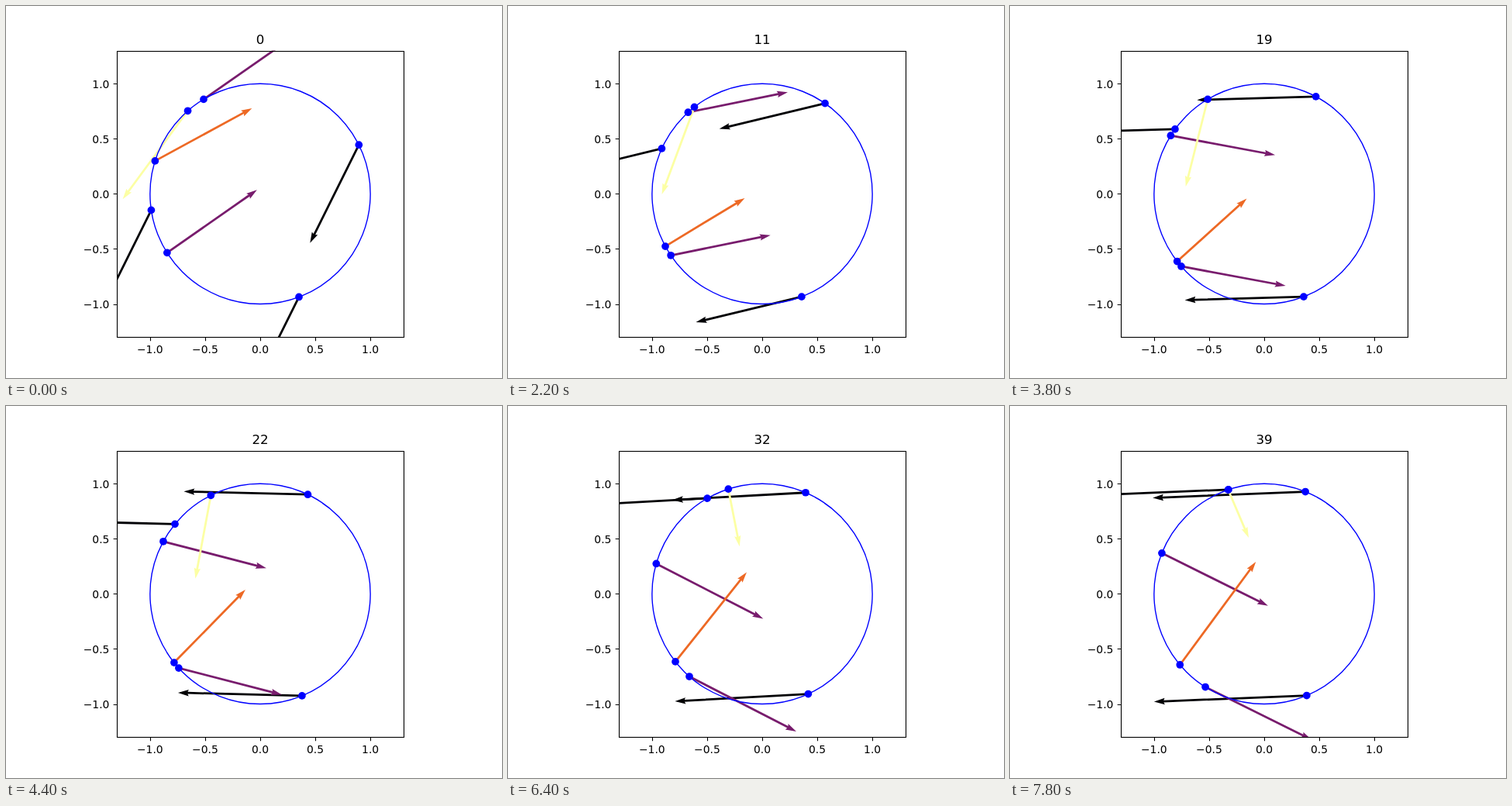
Animation, 640 px wide and 480 px high, one loop 8000 ms. Source, as an HTML page:

```html
<!DOCTYPE html>
<html lang="en">
<head>
<meta charset="utf-8">
<title>Particles on a circle</title>
<style>
  html, body { margin: 0; width: 100%; height: 100%; overflow: hidden; background: #fff; }
  svg { display: block; width: 640px; height: 480px; }
  text { font: 13.89px "DejaVu Sans", sans-serif; }
  #title { font-size: 16.67px; }
</style>
</head>
<body>
<svg viewBox="0 0 640 480">
  <clipPath id="area"><rect x="143.2" y="57.6" width="369.6" height="369.6"/></clipPath>
  <g clip-path="url(#area)">
    <g id="arrows"></g>
    <circle cx="328" cy="242.4" r="142.15" fill="none" stroke="#00f" stroke-width="1.39"/>
    <g id="dots" fill="#00f"></g>
  </g>
  <g id="axes" stroke="#000" stroke-width="1.11" fill="none">
    <rect x="143.5" y="58.5" width="370" height="369"/>
  </g>
  <g id="labels"></g>
  <text id="title" x="328" y="49" text-anchor="middle">0</text>
</svg>
<script>
const CX = 328, CY = 242.4, R = 142.15, STEP = 200, STEPS = 40;
const $ = id => document.getElementById(id);

function add(parent, tag, attrs, text) {
  const el = document.createElementNS('http://www.w3.org/2000/svg', tag);
  for (const k in attrs) el.setAttribute(k, attrs[k]);
  if (text) el.textContent = text;
  return $(parent).appendChild(el);
}

// Axis ticks and labels
for (const v of [-1, -0.5, 0, 0.5, 1]) {
  const label = v.toFixed(1).replace('-', '\u2212');
  const x = CX + v * R, y = CY - v * R;
  const sx = Math.round(x) + 0.5, sy = Math.floor(y + 0.5) + 0.5;
  add('axes', 'path', { d: `M${sx} 427.5v4.86M143.5 ${sy}h-4.86` });
  add('labels', 'text', { x, y: 447.7, 'text-anchor': 'middle' }, label);
  add('labels', 'text', { x: 133.4, y: y + 5.3, 'text-anchor': 'end' }, label);
}

// Steps at which angles (degrees) and arrow vectors (pixels) are known
const keys = [0, 6, 16, 22, 27, 32, 39];

const groups = [
  { color: '#000004',
    dx: [-63, -116, -146.5, -160, -172.5, -172, -197],
    dy: [126.5, 60, 17.5, -4, 5.5, 9.5, 8],
    angles: [[26.4, 47.4, 59, 64.4, 65.8, 66.8, 68.05],
             [188.5, 167.2, 147.9, 140.7, 135.3, 119.9, 108.9],
             [-69.4, -68.05, -69.8, -67.7, -64.8, -65.3, -67.3]] },
  { color: '#781c6d',
    dx: [116, 119, 136.5, 133, 138, 138, 137],
    dy: [-81, -64, 13, 34.5, 50.5, 71, 68],
    angles: [[120.9, 122.8, 143.4, 151.6, 153.9, 164.1, 158.3],
             [212.3, 210.2, 219.1, 222.3, 220.6, 228.6, 237.7]] },
  { color: '#ed6925',
    dx: [125, 118, 89.5, 92, 94.5, 92, 98],
    dy: [-68, -63, -69, -94, -107.5, -115.5, -133],
    angles: [[162.6, 193.2, 216.3, 218.6, 222.9, 218, 220.1]] },
  { color: '#fcffa4',
    dx: [-84, -53, -35, -20, 1.5, 14.5, 26.5],
    dy: [114, 110, 114.5, 107.5, 86, 74, 62],
    angles: [[131.1, 130.2, 124.1, 116.6, 106.6, 107.9, 109.1]] }
];

// Smooth curve through the key values
function curve(v, n) {
  const last = keys.length - 1;
  const gap = i => keys[i + 1] - keys[i];
  const slope = i => (v[i + 1] - v[i]) / gap(i);
  const tangent = i => {
    if (i === 0) return (3 * slope(0) - tangent(1)) / 2;
    if (i === last) return slope(last - 1);
    return (slope(i - 1) * gap(i) + slope(i) * gap(i - 1)) / (gap(i - 1) + gap(i));
  };
  let i = 0;
  while (i < last - 1 && n >= keys[i + 1]) i++;
  const h = gap(i), u = (n - keys[i]) / h, w = 1 - u;
  return v[i] * w * w * (1 + 2 * u) + v[i + 1] * u * u * (3 - 2 * u)
    + h * u * w * (tangent(i) * w - tangent(i + 1) * u);
}

function arrowPath(length) {
  const half = 1.386, head = length - 13.86, notch = length - 12.47;
  return `M0 ${-half}H${notch}L${head} ${-3 * half}L${length} 0L${head} ${3 * half}L${notch} ${half}H0Z`;
}

const particles = groups.flatMap(group => group.angles.map(angle => ({
  group, angle,
  arrow: add('arrows', 'path', { fill: group.color }),
  dot: add('dots', 'circle', { r: 4.86 })
})));

function draw(n) {
  $('title').textContent = n;
  for (const { group, angle, arrow, dot } of particles) {
    const a = curve(angle, n) * Math.PI / 180;
    const x = CX + R * Math.cos(a), y = CY - R * Math.sin(a);
    const dx = curve(group.dx, n), dy = curve(group.dy, n);
    const turn = Math.atan2(dy, dx) * 180 / Math.PI;
    dot.setAttribute('cx', x);
    dot.setAttribute('cy', y);
    arrow.setAttribute('d', arrowPath(Math.hypot(dx, dy)));
    arrow.setAttribute('transform', `translate(${x} ${y}) rotate(${turn})`);
  }
}

const start = performance.now();
function tick() {
  draw(Math.floor((performance.now() - start) / STEP) % STEPS);
  requestAnimationFrame(tick);
}
tick();
</script>
</body>
</html>
```
